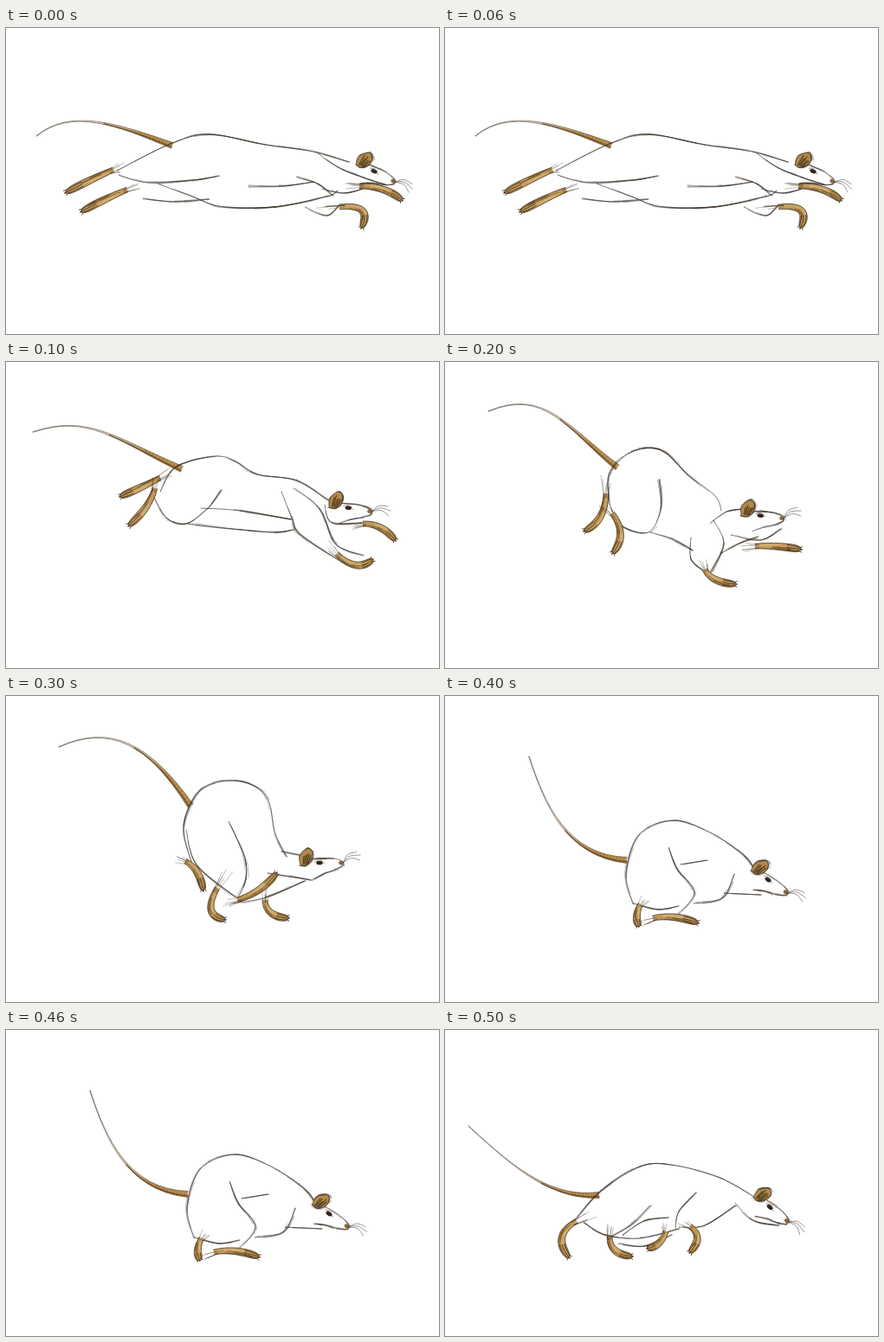
These frames come from a looping animation (500x354 px, 600 ms). An HTML page with a canvas:

```html
<!DOCTYPE html>
<html lang="en">
<head>
<meta charset="utf-8">
<title>Running rat</title>
<style>
html, body { margin: 0; width: 100%; height: 100%; overflow: hidden; background: #fff; }
canvas { display: block; }
</style>
</head>
<body>
<canvas id="stage" width="500" height="354"></canvas>
<script>
const ctx = document.getElementById('stage').getContext('2d');
const STEP = 100;
const RAD = Math.PI / 180;

// tail: Bezier from tip to base; feet: Bezier from ankle to toes;
// body: key points of pencil lines; head: nose x, y, tilt and whisker angle.
const poses = [
  {
    tail: '35,125 75,92 130,112 192,136',
    head: [449, 178, 27, 22],
    body: '128,165 190,134 235,123 300,135 355,143 396,155|360,145 385,162 412,173 438,181|130,170 165,179 215,176 246,171|175,180 215,195 250,207 310,207 370,195 383,188|158,197 195,201 235,198|280,183 320,183 355,178|335,172 360,180 378,194|345,207 370,217 385,205|365,186 390,191 412,186',
    feet: '124,164 100,174 68,191|140,187 115,197 86,213|385,207 425,203 410,232|408,183 440,183 458,200'
  },
  {
    tail: '31,81 95,60 125,88 203,124',
    head: [422, 173, 9, -2],
    body: '178,150 196,122 240,109 265,115 290,130 335,137 372,160|168,150 185,180 208,187 232,170 248,148|210,187 260,193 310,197 332,194|225,169 270,172 330,182|318,150 330,180 340,200 393,235|332,146 362,170 380,210 412,224|368,165 376,186 412,186',
    feet: '178,134 155,146 131,156|172,146 165,170 141,190|382,222 405,245 424,228|412,187 435,187 450,207'
  },
  {
    tail: '50,57 115,30 140,75 199,122',
    head: [391, 181, 7, -24],
    body: '190,165 190,130 215,104 250,102 280,130 312,155 319,172|190,165 205,190 235,197 249,170 247,136|237,197 262,205 286,218|284,203 284,228 299,242|310,183 322,210 308,243|318,222 340,210 362,202|306,187 325,173 345,170|330,200 365,206 388,193',
    feet: '186,152 185,185 160,196|193,175 212,200 193,222|300,240 308,256 337,257|358,213 385,212 412,217'
  },
  {
    tail: '61,59 120,32 165,55 213,127',
    head: [389, 193, 0, -24],
    body: '214,192 205,150 225,108 265,98 300,115 311,160 324,186|257,145 275,185 277,212 268,232|208,155 220,195 265,233|262,240 300,233 345,214|302,205 335,210 352,213|318,180 350,186',
    feet: '207,191 224,200 228,226|244,222 225,255 254,259|267,236 295,228 313,204|299,236 300,256 327,257'
  },
  {
    tail: '97,70 115,125 140,185 210,190',
    head: [395, 228, 35, 14],
    body: '217,240 209,205 225,160 265,144 310,160 345,184 357,200|258,175 268,200 288,228 268,254|272,195 302,190|287,240 320,234 334,206|322,228 365,230|217,240 245,247 270,243',
    feet: '226,241 218,254 224,267|240,257 265,252 293,263'
  },
  {
    tail: '27,111 85,165 125,195 178,191',
    head: [396, 222, 39, 32],
    body: '150,220 180,186 225,158 262,156 315,170 357,193|160,223 185,237 225,241 270,230|190,240 215,225 237,203|205,237 230,221 258,217|266,230 270,210 290,188|270,228 300,226 335,203|200,247 230,250 262,237|335,200 355,220 385,226',
    feet: '152,221 122,238 144,264|190,239 190,260 217,262|255,233 250,250 233,253|283,227 300,240 282,258'
  }
];

// Shapes shared by every pose, measured back from the nose along the face.
const FACE = '-36,-4 -26,-5 -11,-5 -1,-2 0,3 -8,8 -22,13 -34,19';
const EAR = '-49,3 -50,-8 -41,-17 -35,-12 -36,-3 -42,3 -49,3';

let seed;
function rnd(a, b) {
  seed = (seed * 16807) % 2147483647;
  return a + (b - a) * seed / 2147483647;
}

const points = s => s.split(' ').map(p => p.split(',').map(Number));
const mix = (a, b, t) => [a[0] + (b[0] - a[0]) * t, a[1] + (b[1] - a[1]) * t];
const range = (n, f) => Array.from({ length: n }, (_, i) => f(i));

function bezier(pts, t) {
  return pts.length < 2 ? pts[0] : bezier(pts.slice(1).map((p, i) => mix(pts[i], p, t)), t);
}

// Smooth curve through the key points, as many short steps.
function spline(pts, steps = 8) {
  const at = i => pts[Math.max(0, Math.min(pts.length - 1, i))];
  return pts.slice(1).flatMap((c, i) => {
    const a = at(i - 1), b = pts[i], d = at(i + 2);
    const hull = [b, [0, 1].map(k => b[k] + (c[k] - a[k]) / 6), [0, 1].map(k => c[k] - (d[k] - b[k]) / 6), c];
    return range(steps + 1, k => bezier(hull, k / steps));
  });
}

// Point at t along a Bezier, moved sideways by v.
function beside(pts, t, v) {
  const [x, y] = bezier(pts, t);
  const a = bezier(pts, t - .01), b = bezier(pts, t + .01);
  const dx = b[0] - a[0], dy = b[1] - a[1], len = Math.hypot(dx, dy);
  return [x - dy / len * v, y + dx / len * v];
}

function trace(pts) {
  ctx.beginPath();
  pts.forEach(p => ctx.lineTo(...p));
}

function line(pts, color, width) {
  trace(pts);
  ctx.strokeStyle = color;
  ctx.lineWidth = width;
  ctx.stroke();
}

function fill(pts, color) {
  trace(pts);
  ctx.fillStyle = color;
  ctx.fill();
}

// A firm line with loose, overlapping pencil strokes around it.
function sketch(pts) {
  line(pts, 'rgba(50,42,36,.7)', .9);
  for (let i = 0; i < pts.length / 3; i++) {
    const from = Math.floor(rnd(0, pts.length - 6));
    const part = pts.slice(from, from + 12);
    const dx = rnd(-1.5, 1.5), dy = rnd(-1.5, 1.5);
    line(part.map(([x, y], k) => [x + dx * k / 6, y + dy * (1 - k / 8)]), 'rgba(60,48,40,.45)', .7);
  }
}

// Strip along a Bezier, with half its width given by a function of t.
function strip(pts, half) {
  const lane = (v, from = 0, to = 1) => range(17, i => {
    const t = from + (to - from) * i / 16;
    return beside(pts, t, v * half(t));
  });
  return { lane, shape: [...lane(-1), ...lane(1).reverse()] };
}

function drawTail(pts) {
  const { lane, shape } = strip(pts, t => .3 + 3.2 * t ** 2.5);
  const tan = ctx.createLinearGradient(...pts[0], ...pts[3]);
  tan.addColorStop(.3, 'rgba(190,150,90,0)');
  tan.addColorStop(.75, '#b98f50');
  fill(shape, tan);
  [-1, 1].forEach(v => line(lane(v), 'rgba(58,44,30,.75)', .7));
  line(lane(.5, .55), 'rgba(80,52,20,.7)', 1.3);
  for (let t = .8; t < 1; t += .02) {
    line([-1, 1].map(v => beside(pts, t, v * 2)), 'rgba(70,46,20,.45)', .6);
  }
}

function drawFoot(pts) {
  const { lane, shape } = strip(pts, t => (2.8 + 2.2 * t) * Math.sqrt(1 - t ** 8));
  fill(shape, '#bf9858');
  for (let v = -.8; v < 1; v += .2) {
    const from = rnd(0, .5);
    line(lane(v, from, from + .4), v < 0 ? 'rgba(224,194,140,.6)' : 'rgba(84,54,20,.6)', .9);
  }
  [-1, 1].forEach(v => line(lane(v), 'rgba(48,34,20,.8)', .9));
  // Toes
  [-.65, 0, .65].forEach(v => {
    const toe = beside(pts, 1, v * 5);
    line([...lane(v, .68, .95), toe], 'rgba(44,28,14,.85)', 1);
  });
  // Fur above the ankle
  for (let i = 0; i < 6; i++) {
    const v = rnd(-4, 4);
    line([beside(pts, .08, v * .7), beside(pts, rnd(-.3, -.1), v * 1.4)], 'rgba(70,54,38,.55)', .6);
  }
}

function drawHead([x, y, tilt, whiskers]) {
  const cos = Math.cos(tilt * RAD), sin = Math.sin(tilt * RAD);
  const place = ([u, v]) => [x + u * cos - v * sin, y + u * sin + v * cos];
  const shape = s => spline(points(s).map(place));
  const spot = (p, rx, ry, color) => {
    ctx.beginPath();
    ctx.ellipse(...place(p), rx, ry, tilt * RAD, 0, 7);
    ctx.fillStyle = color;
    ctx.fill();
  };
  sketch(shape(FACE));
  fill(shape(EAR), '#b08a4c');
  sketch(shape(EAR));
  for (let i = 0; i < 5; i++) {
    line([[-46 + i * 1.5, 1], [-45 + i * 2, rnd(-12, -7)]].map(place), 'rgba(52,34,16,.75)', 1.2);
  }
  spot([-27, 0], 3.8, 2.3, '#35261a');
  line(shape('-33,-1 -27,-3 -21,1'), 'rgba(50,38,30,.7)', .7);
  spot([-2, 0], 2.8, 2.3, '#8a6540');
  for (let i = -1; i < 2; i++) {
    const a = (whiskers + i * 15) * RAD, bend = a - .35;
    const tip = r => [x + r * Math.cos(a), y + r * Math.sin(a)];
    const mid = [x + 11 * Math.cos(bend), y + 11 * Math.sin(bend)];
    line(spline([[x, y], mid, tip(22 - i * i * 2)]), 'rgba(60,50,44,.75)', .7);
  }
}

function draw(pose, index) {
  seed = 71 + index * 13;
  ctx.fillStyle = '#fff';
  ctx.fillRect(0, 0, 500, 354);
  ctx.lineCap = ctx.lineJoin = 'round';
  drawTail(points(pose.tail));
  pose.body.split('|').forEach(s => sketch(spline(points(s))));
  pose.feet.split('|').forEach(s => drawFoot(points(s)));
  drawHead(pose.head);
}

let shown = -1;
function tick() {
  const i = Math.floor(performance.now() / STEP) % poses.length;
  if (i !== shown) draw(poses[i], shown = i);
  requestAnimationFrame(tick);
}
tick();
</script>
</body>
</html>
```
